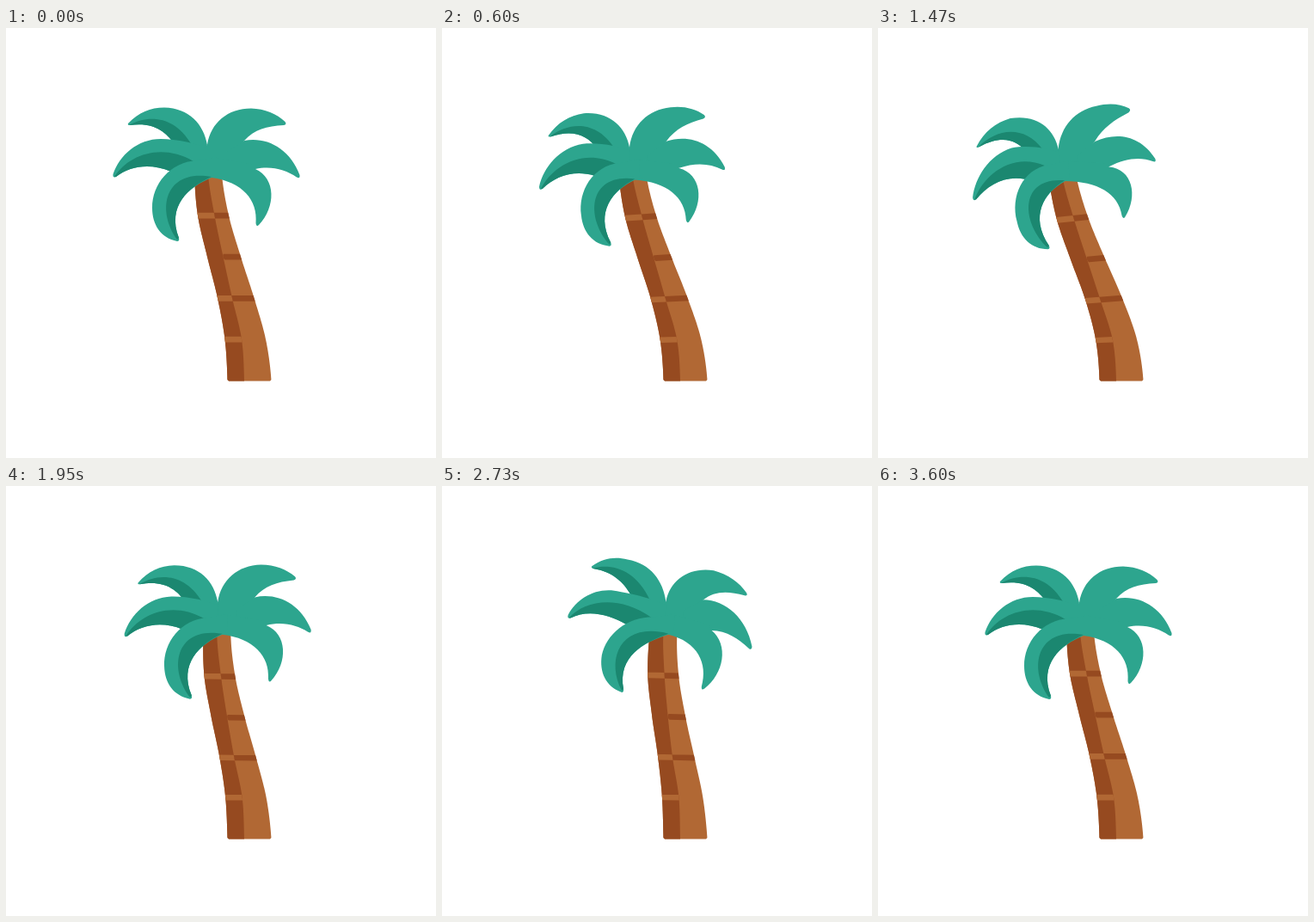
Animation of 500 by 500 pixels, one loop 5.63 s. Source, as an HTML page with a canvas:

```html
<!DOCTYPE html>
<html lang="en">
<head>
<meta charset="utf-8">
<title>Swaying palm</title>
<style>
html, body { margin: 0; height: 100%; overflow: hidden; background: #fff; }
canvas { display: block; width: 100vw; height: 100vh; object-fit: contain; }
</style>
</head>
<body>
<canvas id="stage" width="500" height="500"></canvas>
<script>
const ctx = document.getElementById('stage').getContext('2d');
const LOOP = 5630, SWAY = 3600, STEP = 30;
const GREEN = '#2da58e', SHADE = '#1b8770', BARK = '#b16834', DARK = '#964a20';
const HUB = { x: 234, y: 135 };

// [time, value] keys, eased in and out
const SHIFT = [[0, 0], [1200, -32], [2400, 32], [3600, 0]];
const TURN = [[0, 0], [1200, -13], [1380, -13], [2540, 10.6], [3600, 0]];

// Resting trunk: left edge, shade edge and right edge, every 48 px from y = 170
const TOP = 170, ROW = 48, BASE = 410.5;
const EDGES = [
  [219, 223, 234, 246, 254.5, 257.5],
  [235, 242.5, 252.5, 263, 274, 277],
  [251, 259, 273, 288.5, 302, 308.5]
];

// Each leaf: swing gain, outline, optional shaded underside
const LEAVES = [
  [1, 'M222 142L234 136L272 138L288 163L240 174L226 160Z'],
  [1.07, 'M142 111C154 98 168 92.5 184 92.5C213 93 230 112 234 136L225 150L195 134C186 121 172 109 144 113Q141 113 142 111Z',
    'M144 112.5C165 101 196 101 216 136L195 134C186 121 172 109 144 113Z'],
  [0.97, 'M124.5 170C132 148 153 129 180 129C198 129 222 134 240 142L230 160L192 167C168 157 145 160 128 173Q124 175 124.5 170Z',
    'M126 173C142 148 180 133 218 155L210 170L192 167C168 157 145 160 128 173Z'],
  [1.07, 'M234 136C238 110 258 93.5 285 93.5C301 94 315 100 324.5 109Q327 112 323 113C303 114 289 118 277 131L255 155L234 160Z'],
  [0.97, 'M255 145L277 131C303 126 330 140 341.5 171Q342 176 338 173.5C325 165 309 160 290 164L255 165Z'],
  [0.92, 'M240 150L285 158L290 164C314 175 314 208 294 229Q291 232 290.5 227C293 200 275 179 239 174L225 160Z'],
  [0.9, 'M199 248C180 244 170 229 170 209C170 182 190 156 222 154L245 150L245 170L239 174C212 185 187 207 201 244Q202 248 199 248Z',
    'M199 246C174 211 185 163 239 173C212 185 187 207 201 244Z']
];

function keyed(keys, t) {
  const i = Math.max(1, keys.findIndex(k => t <= k[0]));
  const [t0, a] = keys[i - 1], [t1, b] = keys[i];
  return a + (b - a) * (1 - Math.cos(Math.PI * (t - t0) / (t1 - t0))) / 2;
}

function edgeX(edge, y) {
  const p = EDGES[edge], s = (y - TOP) / ROW;
  const i = Math.min(p.length - 2, Math.max(0, Math.floor(s))), f = s - i;
  const a = p[i], b = p[i + 1];
  const ma = i ? (b - p[i - 1]) / 2 : (b - a) / 2;
  const mb = i + 2 < p.length ? (p[i + 2] - a) / 2 : (b - a) / 2;
  return a + f * ma + f * f * (3 * (b - a) - 2 * ma - mb) + f * f * f * (2 * (a - b) + ma + mb);
}

// Bends a resting trunk point sideways, with tilt and a slight drop
function bend(x, y, shift, drop) {
  const u = (BASE - y) / 275;
  const tilt = shift * (3.7 * u - 2.55 * u * u) / 275 * (shift < 0 ? 0.85 : 0.25);
  const sink = drop * Math.min(1, Math.max(0, (BASE - 45 - y) / 100));
  return [x + shift * u * u * (1.85 - 0.85 * u), y + sink + (x - edgeX(1, y)) * tilt];
}

function strip(left, right, y0, y1, color, pose, inset = 0) {
  const a = [], b = [], n = 160;
  for (let i = 0; i <= n; i++) {
    const y = y0 + (y1 - y0) * i / n;
    const round = inset * (1 - Math.sqrt(1 - (2 * i / n - 1) ** 2));
    const foot = Math.max(0, y - BASE + 1.5);
    a.push(bend(edgeX(left, y) + round + (left ? 0 : foot), y, ...pose));
    b.unshift(bend(edgeX(right, y) - (right > 1 ? foot : 0), y, ...pose));
  }
  ctx.beginPath();
  for (const p of a.concat(b)) ctx.lineTo(...p);
  ctx.fillStyle = color;
  ctx.fill();
}

// Leaves bend: points turn further the farther they are from the hub
function fillLeaf(path, color, x, y, turn) {
  const bent = path.replace(/([\d.]+) ([\d.]+)/g, (_, px, py) => {
    const dx = px - HUB.x, dy = py - HUB.y;
    const angle = turn * Math.min(1, (Math.hypot(dx, dy) / 95) ** 1.2);
    const c = Math.cos(angle), s = Math.sin(angle);
    return (x + dx * c - dy * s).toFixed(2) + ' ' + (y + dx * s + dy * c).toFixed(2);
  });
  ctx.fillStyle = color;
  ctx.fill(new Path2D(bent));
}

function draw(t) {
  const shift = keyed(SHIFT, t), turn = keyed(TURN, t) * Math.PI / 180;
  const pose = [shift, 3.3 * Math.sin(Math.PI * t / SWAY)];
  ctx.clearRect(0, 0, 500, 500);

  strip(0, 2, 164, BASE, BARK, pose);
  strip(0, 1, 164, BASE, DARK, pose);
  for (const y of [214.8, 311, 358.8]) strip(0, 1, y, y + 6.7, BARK, pose);
  for (const y of [214.8, 262.7, 311]) strip(1, 2, y, y + 6.7, DARK, pose, y > 250 && y < 300 ? 1.5 : 0);

  const x = HUB.x + shift, y = 133.5 + 0.0026 * (x - 258) ** 2;
  for (const [gain, leaf, under] of LEAVES) {
    fillLeaf(leaf, GREEN, x, y, turn * gain);
    if (under) fillLeaf(under, SHADE, x, y, turn * gain);
  }
}

const start = performance.now();
function frame() {
  const t = (performance.now() - start) % LOOP;
  draw(Math.min(SWAY, Math.floor(t / STEP) * STEP));
  requestAnimationFrame(frame);
}
frame();
</script>
</body>
</html>
```
